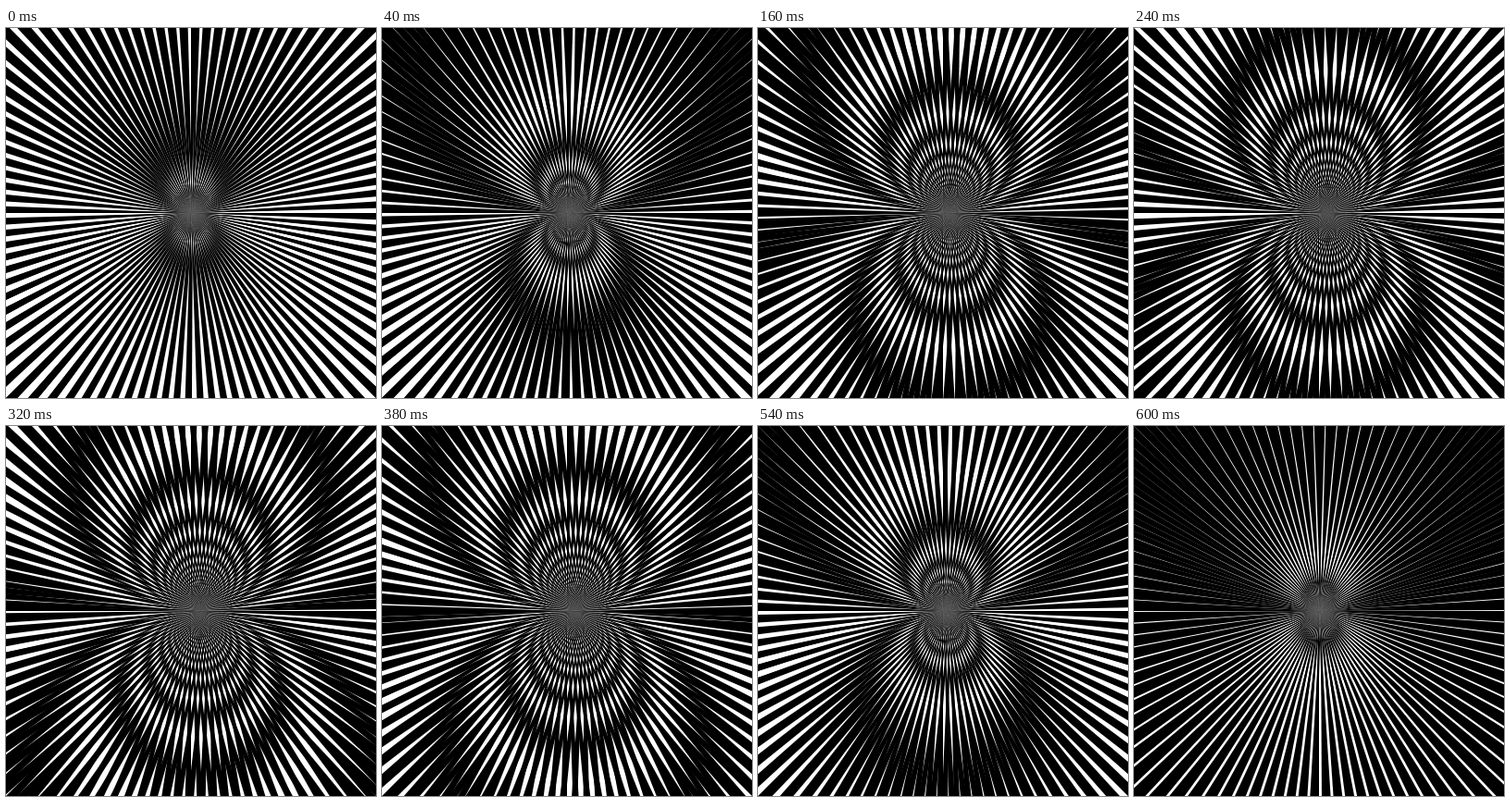
Recreate the animation shown at these times as an HTML page with a canvas. Size 400 by 400 pixels, loop 0.62 s.

```html
<!DOCTYPE html>
<html>
<head>
<meta charset="utf-8">
<style>
html, body { margin: 0; width: 100%; height: 100%; overflow: hidden; background: #fff; }
canvas { display: block; }
</style>
</head>
<body>
<canvas id="stage" width="400" height="400"></canvas>
<script>
const ctx = document.getElementById('stage').getContext('2d');
const RAYS = 100, PITCH = 2 * Math.PI / RAYS, REACH = 400;
const STEP = 20, LOOP = 620, CYCLE = 32;

// Fan of black wedges, each half a pitch wide
function fan(x, y, angle) {
  for (let i = 0; i < RAYS; i++) {
    const a = angle + i * PITCH, b = a + PITCH / 2;
    ctx.beginPath();
    ctx.moveTo(x, y);
    ctx.lineTo(x + REACH * Math.cos(a), y + REACH * Math.sin(a));
    ctx.lineTo(x + REACH * Math.cos(b), y + REACH * Math.sin(b));
    ctx.fill();
  }
}

function draw(now) {
  const p = (Math.floor(now % LOOP / STEP) + 1) / CYCLE;
  ctx.fillStyle = '#fff';
  ctx.fillRect(0, 0, 400, 400);
  ctx.fillStyle = '#000';
  fan(200, 200, 0);
  fan(200 + 20 * Math.sin(Math.PI * p), 200, 2.5 * PITCH * p);
  requestAnimationFrame(draw);
}
requestAnimationFrame(draw);
</script>
</body>
</html>
```
